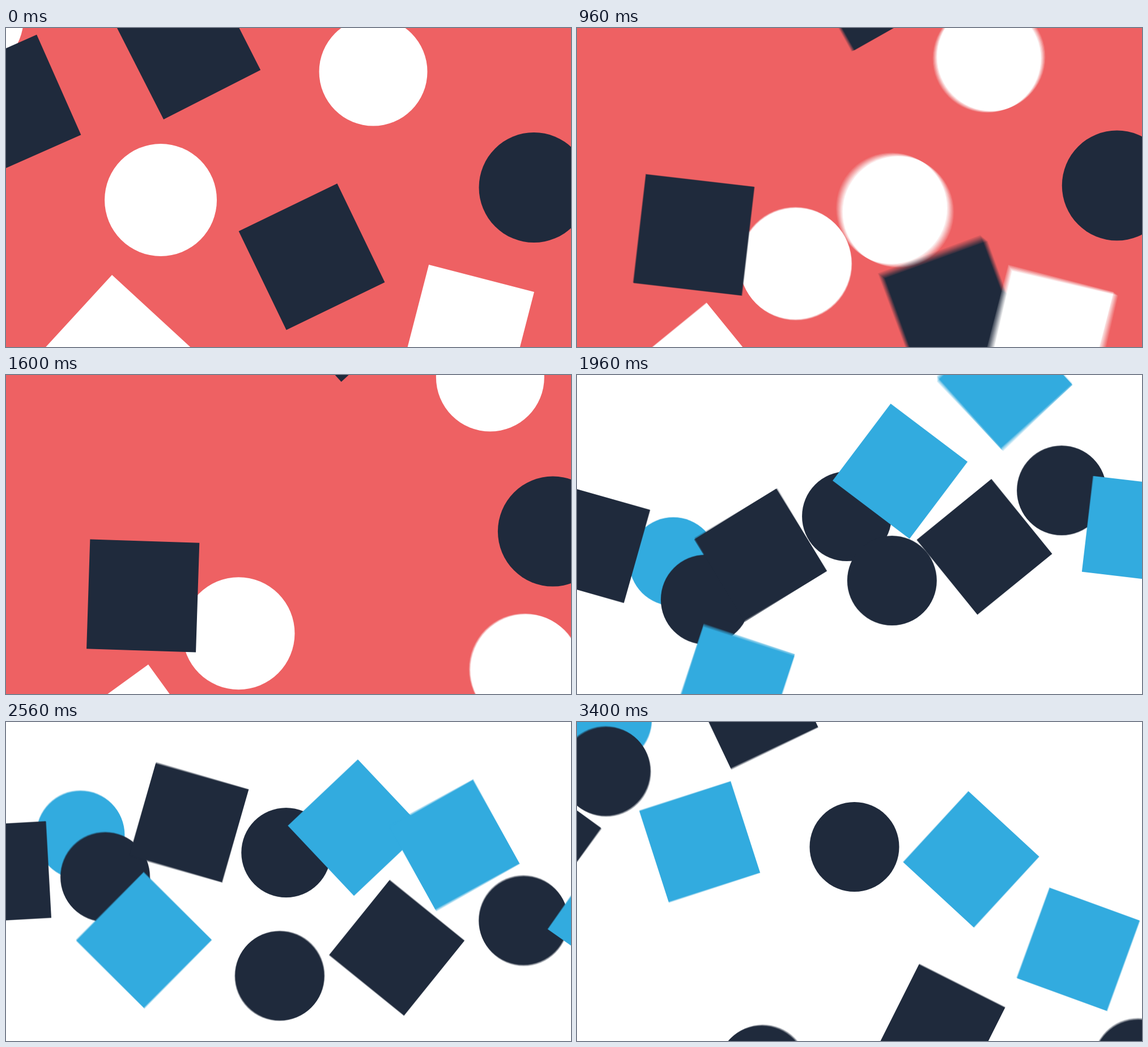
Animation, 997 px wide and 562 px high, one loop 3440 ms. Source, as an HTML page with a canvas:

```html
<!DOCTYPE html>
<html lang="en">
<head>
<meta charset="utf-8">
<title>Drifting shapes</title>
<style>
  html, body { margin: 0; width: 100%; height: 100%; overflow: hidden; background: #fff; }
  canvas { display: block; width: 997px; height: 562px; }
</style>
</head>
<body>
<canvas id="stage" width="997" height="562"></canvas>
<script>
const W = 997, H = 562;
const LOOP = 3440, CUT = 1720, STEP = 40;
const SHUTTER = 12, SAMPLES = 8;
const RED = '#ee6163', NAVY = '#1f2a3c', WHITE = '#ffffff', BLUE = '#32abdf';

const ctx = document.getElementById('stage').getContext('2d', { alpha: false });
const layer = document.createElement('canvas');
layer.width = W;
layer.height = H;
const pen = layer.getContext('2d', { alpha: false });

// Poses are [x, y, degrees]. A shape rests at `from` until it is hit, then travels `by`.
// `bow` bends the way there; `run` is an accelerating approach that ends at the hit.
const circle = (color, r, from, move) => ({ color, r, from, ...move });
const square = (color, side, from, move) => ({ color, side, from, ...move });

// Sudden pushes that die away, on top of a slow sideways drift.
const pushed = {
  back: RED,
  start: 0,
  hit: 640,
  drift: 1 / 64,
  progress: (age, tau = 200) => 1 - Math.exp(-age / tau),
  shapes: [
    circle(WHITE, 98, [110, 75], { tau: 500, by: [933, 520], run: [177, 92] }),
    circle(WHITE, 99, [273, 303], { hit: 670, by: [128, 154], bow: [6, -8] }),
    circle(WHITE, 95.5, [648, 77], { hit: 880, by: [198, -75] }),
    circle(NAVY, 97, [931.5, 281], { hit: 0, tau: 5000, by: [122, -20] }),
    square(NAVY, 193, [102, 272, 9.7],
      { tau: 260, by: [133, 119, -8.4], bow: [0, 10, 4], run: [97, 133, 33.6] }),
    square(NAVY, 192, [320, 32, -27], { hit: 690, by: [270, -157, -16.2], bow: [-9, -8, 13.5] }),
    square(NAVY, 193, [539.5, 403, -25.8], { hit: 860, tau: 400, by: [488, 411, 19] }),
    square(WHITE, 192, [815, 534, 14.5], { hit: 955, tau: 400, by: [350, 330, -25] }),
    square(WHITE, 192, [192.7, 570.6, 42.6], { hit: 750, by: [26, 74.5, 11.6], bow: [-7, 0] })
  ]
};

// A steady, weightless spreading apart.
const floating = {
  back: WHITE,
  start: CUT,
  hit: 240,
  drift: 0,
  progress: age => age / 1440,
  shapes: [
    circle(BLUE, 78, [170, 329], { by: [-116, -333], bow: [10, 9] }),
    circle(NAVY, 79, [227, 396], { by: [-176, -309], bow: [22, 6] }),
    circle(NAVY, 79, [476, 249], { by: [13.5, -29], bow: [13, -7] }),
    circle(NAVY, 79, [556, 362], { by: [-229, 251], bow: [23, -20] }),
    circle(NAVY, 79, [855, 203], { by: [135, 399], bow: [2, -20] }),
    square(NAVY, 170.5, [24, 296.5, 16], { by: [-100, -90.5, -70], bow: [8, 6, 16] }),
    square(NAVY, 170.5, [324, 317.5, -31.8], { by: [-12, -348.5, 96.3], bow: [4, 5] }),
    square(NAVY, 170, [719, 302.5, 51], { by: [-77.5, 238, -24.3], bow: [3, -4] }),
    square(BLUE, 170, [570, 169.5, 37], { by: [125.5, 72.5, 5.7], bow: [-5, -14, 7] }),
    square(BLUE, 169.5, [754.5, 12, 138], { by: [130, 388.5, -118], bow: [-18, 44, -19], run: [0, 80] }),
    square(BLUE, 169.5, [277.5, 546.5, 17.9], { by: [-61, -335.5, 54.2], bow: [-9, -23], run: [-10, -80] }),
    square(BLUE, 170, [985, 272, 6.5], { by: [235, 178, 57.5], bow: [-9, -2] })
  ]
};

function pose(shape, scene, t) {
  const { from, by, bow = [], run = [], tau, hit = scene.hit } = shape;
  const e = scene.progress(Math.max(0, t - hit), tau);
  const ahead = t < hit ? 1 - (t / hit) ** 2 : 0;
  const at = (i, p) => (from[i] || 0) + (by[i] || 0) * p
    + (bow[i] || 0) * 4 * e * (1 - e) - (run[i] || 0) * ahead;
  // Spin settles sooner than travel.
  return { x: at(0, e) + scene.drift * Math.min(t, hit || 0), y: at(1, e), turn: at(2, e ** 0.8) };
}

function paint(scene, t) {
  pen.fillStyle = scene.back;
  pen.fillRect(0, 0, W, H);
  for (const shape of scene.shapes) {
    const { x, y, turn } = pose(shape, scene, t);
    pen.save();
    pen.translate(x, y);
    pen.rotate(turn * Math.PI / 180);
    pen.fillStyle = shape.color;
    pen.beginPath();
    if (shape.r) pen.arc(0, 0, shape.r, 0, 2 * Math.PI);
    else pen.rect(-shape.side / 2, -shape.side / 2, shape.side, shape.side);
    pen.fill();
    pen.restore();
  }
}

// Averages several moments within the shutter time for motion blur.
function render(t) {
  const scene = t < CUT ? pushed : floating;
  for (let i = 0; i < SAMPLES; i++) {
    const moment = t - scene.start + (i / (SAMPLES - 1) - 0.5) * SHUTTER;
    paint(scene, Math.max(0, moment));
    ctx.globalAlpha = 1 / (i + 1);
    ctx.drawImage(layer, 0, 0);
  }
}

const begin = performance.now();
function tick() {
  const t = (performance.now() - begin) % LOOP;
  render(Math.floor(t / STEP) * STEP);
  requestAnimationFrame(tick);
}
tick();
</script>
</body>
</html>
```
